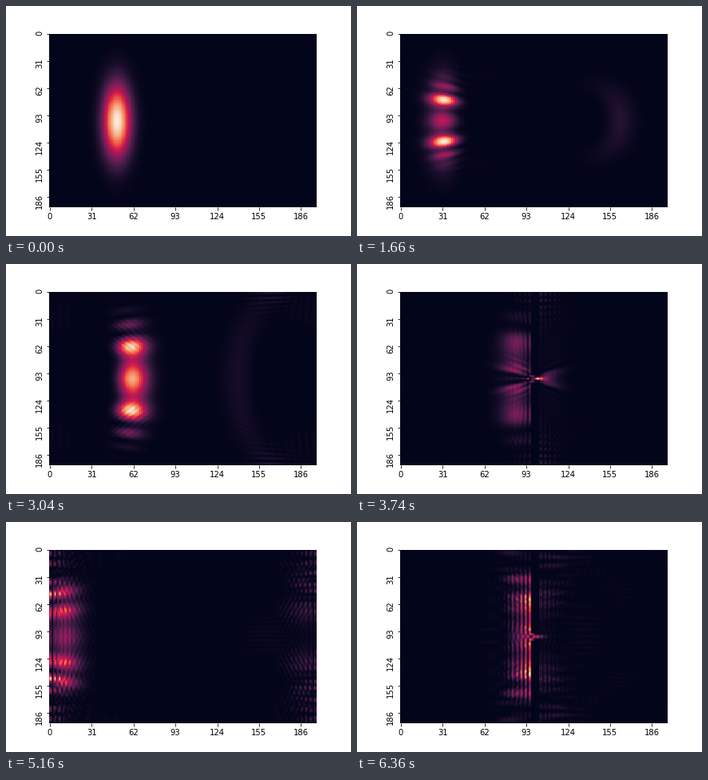
Recreate the animation shown at these times as a matplotlib script. Size 432 by 288 pixels, loop 6380 ms.

```python
"""Quantum wave packet hitting a wall with one slit (Crank-Nicolson, exact solves)."""
import numpy as np
import matplotlib.pyplot as plt
from matplotlib.animation import FuncAnimation
from matplotlib.colors import LinearSegmentedColormap

N, FRAMES, INTERVAL = 198, 319, 20
DX = 1 / 199
DT = 5e-5 / DX**2                 # time step in units of the grid spacing
K0 = 200 * DX                     # wave number per cell
X0, Y0 = 0.25 / DX, 0.5 / DX
SX, SY = 0.05 / DX, 0.2 / DX
WALL = slice(97, 103)
SLIT = slice(95, 104)

rocket = LinearSegmentedColormap.from_list("rocket", [
    (0, "#03051a"), (1 / 7, "#35193e"), (2 / 7, "#701f57"), (3 / 7, "#ad1759"),
    (0.5, "#cb1b4f"), (4 / 7, "#e13342"), (5 / 7, "#f37651"),
    (6 / 7, "#f6b48f"), (1, "#faebdd")])


def modes(n):
    """Sine modes of a closed 1D box and their energies."""
    j = np.arange(1, n + 1)
    basis = np.sqrt(2 / (n + 1)) * np.sin(np.pi * np.outer(j, j) / (n + 1))
    return basis, 1 - np.cos(np.pi * j / (n + 1))


def kinetic(n):
    return np.eye(n) - 0.5 * (np.eye(n, k=1) + np.eye(n, k=-1))


SIN_Y, E_Y = modes(N)
MOUTH = SIN_Y[SLIT]
HOP = 1j * DT / 4


class Room:
    """Box on one side of the wall, stored as sine-mode coefficients."""

    def __init__(self, psi, edge):
        self.basis, e_x = modes(psi.shape[1])
        self.near = self.basis[edge]
        self.gain = 1 / (1 + 0.5j * DT * (E_Y[:, None] + e_x))
        self.c = SIN_Y @ psi @ self.basis
        self.green = (MOUTH * (self.gain @ self.near**2)) @ MOUTH.T

    def solve(self):
        self.u = self.gain * self.c
        return MOUTH @ (self.u @ self.near)

    def advance(self, inflow):
        source = HOP * np.outer(MOUTH.T @ inflow, self.near)
        self.c = 2 * (self.u + self.gain * source) - self.c

    def density(self):
        return np.abs(SIN_Y @ self.c @ self.basis)**2


def simulate():
    y, x = np.mgrid[:N, :N]
    psi = np.exp(-0.5 * ((x - X0) / SX)**2 - 0.5 * ((y - Y0) / SY)**2
                 + 1j * K0 * (x - X0))
    left = Room(psi[:, :WALL.start], -1)
    right = Room(psi[:, WALL.stop:], 0)
    gap = psi[SLIT, WALL].copy()
    h, w = gap.shape

    energy = np.kron(kinetic(h), np.eye(w)) + np.kron(np.eye(h), kinetic(w))
    m = np.eye(h * w) + 0.5j * DT * energy
    m[0::w, 0::w] -= HOP**2 * left.green
    m[w - 1::w, w - 1::w] -= HOP**2 * right.green
    inverse = np.linalg.inv(m)

    out = []
    for _ in range(FRAMES):
        p = np.zeros((N, N))
        p[:, :WALL.start] = left.density()
        p[:, WALL.stop:] = right.density()
        p[SLIT, WALL] = np.abs(gap)**2
        out.append(p.astype(np.float32))

        rhs = gap.copy()
        rhs[:, 0] += HOP * left.solve()
        rhs[:, -1] += HOP * right.solve()
        half = (inverse @ rhs.ravel()).reshape(h, w)
        left.advance(half[:, 0])
        right.advance(half[:, -1])
        gap = 2 * half - gap
    return out


density = simulate()

fig = plt.figure(figsize=(6, 4), dpi=72, facecolor="white")
ax = fig.add_axes([0.125, 0.125, 0.775, 0.755])
image = ax.imshow(density[0], cmap=rocket, aspect="auto", interpolation="nearest",
                  extent=(0, N, N, 0))
ticks = np.arange(0, N, 31)
ax.set_xticks(ticks + 0.5, ticks)
ax.set_yticks(ticks + 0.5, ticks, rotation="vertical")
ax.spines[:].set_visible(False)


def update(i):
    p = density[i]
    image.set_data(p)
    image.set_clim(p.min(), p.max())
    return [image]


anim = FuncAnimation(fig, update, frames=FRAMES, interval=INTERVAL,
                     repeat=True, repeat_delay=0)
plt.show()
```
